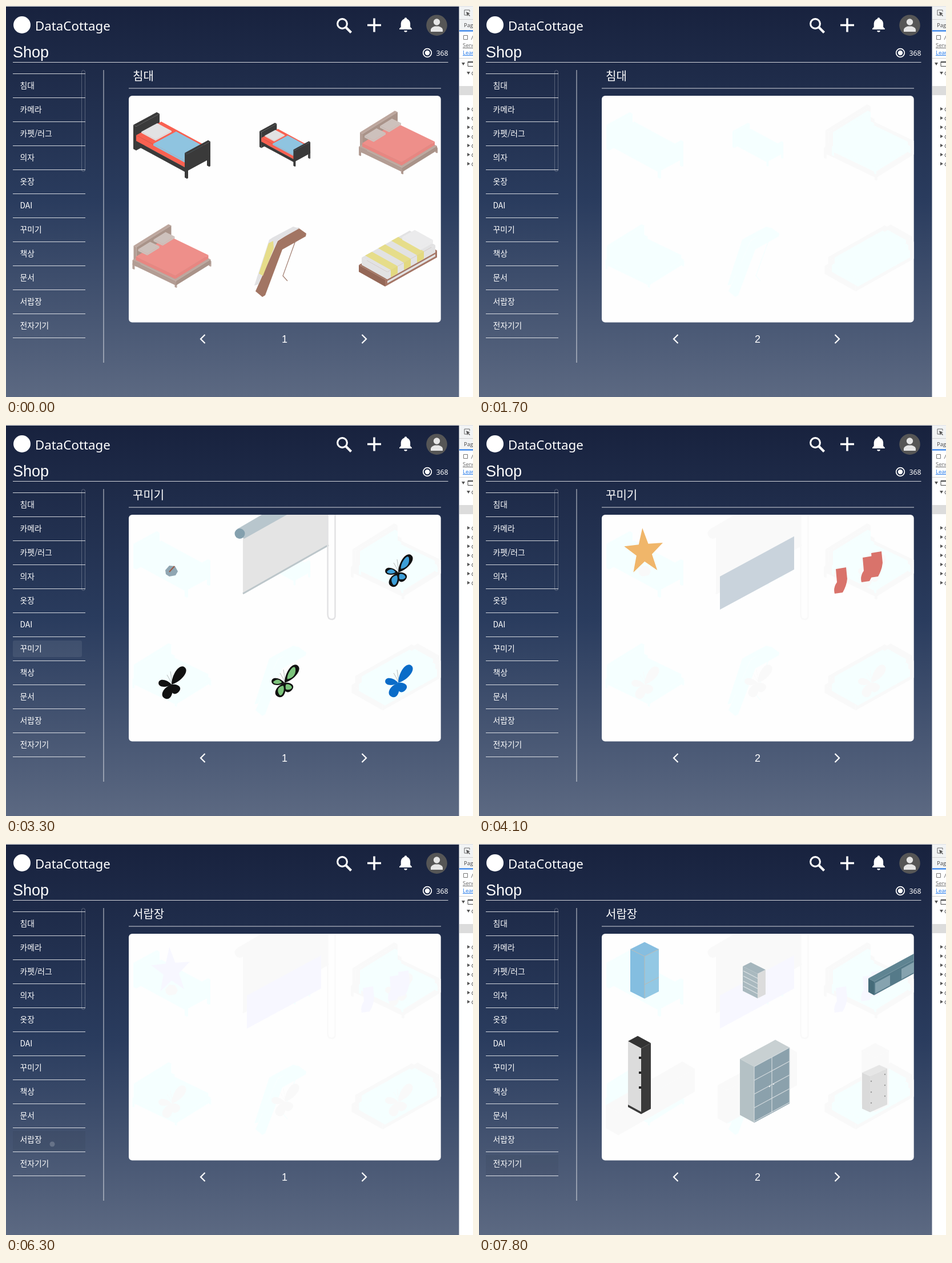
Write an HTML page that moves like this. It is 818 by 684 pixels and loops after 8 s.

```html
<!DOCTYPE html>
<html lang="ko">
<head>
<meta charset="utf-8">
<title>Shop</title>
<style>
html, body { margin: 0; width: 100%; height: 100%; overflow: hidden; background: #fff; }
svg { display: block; width: 100vw; height: 100vh; }
text { font-family: "Noto Sans CJK KR", "Noto Sans CJK", "Noto Sans", sans-serif; fill: #fff; }
.latin { font-family: "Noto Sans", sans-serif; }
.arial { font-family: "Liberation Sans", Arial, sans-serif; }
.tool { font: 9.5px "Open Sans", sans-serif; fill: #444; }
</style>
</head>
<body>
<svg id="stage" viewBox="0 0 818 684" preserveAspectRatio="none"></svg>
<script>
const LOOP = 8000, STEP = 100;
const MENU = ['침대', '카메라', '카펫/러그', '의자', '옷장', 'DAI', '꾸미기', '책상', '문서', '서랍장', '전자기기'];
const TINTS = { gray: '#f9f9f9', cyan: '#f5ffff', lilac: '#f7f7ff', white: '#fefefe' };

const poly = (points, fill) => `<polygon points="${points}" fill="${fill}"/>`;
const path = (d, fill) => `<path d="${d}" fill="${fill}"/>`;
const line = (d, color, width = 1) =>
  `<path d="${d}" fill="none" stroke="${color}" stroke-width="${width}"/>`;
const rect = (x, y, w, h, fill, rx = 0) =>
  `<rect x="${x}" y="${y}" width="${w}" height="${h}" rx="${rx}" fill="${fill}"/>`;
const dot = (x, y, r, fill) => `<circle cx="${x}" cy="${y}" r="${r}" fill="${fill}"/>`;
const ring = (x, y, r, color, width) =>
  `<circle cx="${x}" cy="${y}" r="${r}" fill="none" stroke="${color}" stroke-width="${width}"/>`;
const text = (x, y, size, body, extra = '') =>
  `<text x="${x}" y="${y}" font-size="${size}" ${extra}>${body}</text>`;
const group = (id, body) => `<g id="${id}">${body}</g>`;
const move = (transform, body) => `<g transform="${transform}">${body}</g>`;
const times = (n, f) => Array.from({ length: n }, (_, i) => f(i)).join('');
const scaleAt = (x, y, s) => `translate(${x} ${y}) scale(${s}) translate(${-x} ${-y})`;
const ghost = (id, tint, body) => `<g id="${id}" filter="url(#${tint})">${body}</g>`;

// Isometric box: (x, y) is the left corner of its top, a runs to the front, b to the back.
function box(x, y, a, b, h, [top, left, right], ka = .54, kb = ka) {
  const da = a * ka, db = b * kb, mx = x + a, my = y + da, rx = mx + b, ry = my - db;
  return poly(`${x},${y} ${x + b},${y - db} ${rx},${ry} ${mx},${my}`, top) +
    poly(`${x},${y} ${mx},${my} ${mx},${my + h} ${x},${y + h}`, left) +
    poly(`${mx},${my} ${rx},${ry} ${rx},${ry + h} ${mx},${my + h}`, right);
}
const plain = color => [color, color, color];

const DARK = plain('#3a3a3a'), RED = plain('#f96151'), BLUE = plain('#8fc4e0'), LINEN = plain('#e2e2e3');
const TAN = ['#bda79e', '#b39d94', '#a99389'], PINK = ['#ee8f8a', '#e88681', '#e88681'], CUSHION = plain('#cdc1bc');
const WOOD = ['#a27563', '#946757', '#a57666'], YELLOW = ['#e6dd8a', 'none', '#e3d980'];
const SLATE = ['#c8d0d2', '#b4c1c5', '#8ba1ac'], PALE = ['#e6e6e6', '#dadada', '#dedede'];
const SKY = ['#86bee0', '#84bee0', '#93c8e4'], TEAL = ['#5f8492', '#456b79', '#557a89'];

// Beds
const singleBed =
  box(223, 208, 5, 41, 42, DARK) + box(228, 236, 86, 44, 8, DARK) + box(228, 226, 86, 44, 10, RED) +
  box(237, 220, 25, 28, 2, LINEN) + box(258, 241, 55, 40, 3, BLUE) +
  box(313, 257, 4, 41, 28, DARK) + box(313, 284, 4, 2, 16, DARK) + box(352, 262, 4, 2, 17, DARK);
const tanBox = (x, y, a, b, h, colors) => box(x, y, a, b, h, colors, .48, .62);
const doubleBed =
  tanBox(620, 221, 5, 61, 34, TAN) + [[618, 252], [692, 284], [752, 247]].map(([x, y]) => tanBox(x, y, 3, 1, 9, TAN)).join('') +
  tanBox(618, 246, 76, 61, 8, TAN) + tanBox(624, 240, 69, 58, 6, PINK) +
  tanBox(628, 227, 16, 21, 3, CUSHION) + tanBox(655, 210, 16, 21, 3, CUSHION);
const wallBed =
  poly('437,499 476,411 512,388 526,398 525,403 484,426 454,506 449,509', '#a27563') +
  poly('435,489 461,409 467,405 503,386 514,389 476,410 442,487', '#e2e2e4') +
  poly('443,468 460,415 468,411 469,424 450,472', '#e6dd8a') +
  line('M507 411L485 472l8 9', '#a58376', 1.3);
const woodBox = (x, y, a, b, h, colors) => box(x, y, a, b, h, colors, .56);
const stripedBed =
  woodBox(618, 453, 46, 91, 12, WOOD) + woodBox(668, 481, 0, 84, 4, LINEN) +
  woodBox(623, 440, 45, 84, 13, LINEN) +
  times(3, i => woodBox(629 + 23 * i, 436.6 - 12.9 * i, 45, 12, 13, YELLOW)) +
  woodBox(694, 404, 32, 22, 5, plain('#ebebec'));
const otherBeds = singleBed + move('translate(296.8 81.6) scale(.66)', singleBed) +
  move('translate(-396.5 198.5)', doubleBed) + wallBed;

// Decorations
const WINGS = [[-53, 38, 11], [50, 18, 11], [188, 23, 8], [116, 27, 11]]; // angle, length, width
const wing = ([angle, len, w], s, fill) => move(`translate(23 31) rotate(${angle})`,
  path(`M${len * (1 - s) * .6} 0C${len * .4} ${-w * s} ${len} ${-w * s} ${len * (s + 1) / 2} 0S${len * .4} ${w * s} ${len * (1 - s) * .6} 0z`, fill));
const butterfly = (x, y, edge, cell = edge) => move(`translate(${x} ${y})`,
  line('M23 28L15 14M24 28L21 8', '#999', .7) +
  WINGS.map(w => wing(w, 1, edge) + wing(w, .65, cell)).join(''));
const blind =
  poly('415,197 485,157 564,157 564,211 415,296', '#e4e4e4') +
  poly('405,182 448,157 492,157 417,199', '#b8c6cd') + dot(409.5, 190, 9, '#84a0ae') +
  line('M415 295L565 210', '#bcc6ca', 3) + line('M563.5 157V331q0 9 7 9t6-9V157', '#e2e2e4', 2.5);
const smallDecor =
  poly('279,254 286,246 296,247 301,256 297,263 286,265 280,261', '#8fa6b2') + line('M286 257l9-10', '#9a5b48', 2) +
  butterfly(664, 227, '#111', '#3d9fd8') + butterfly(267, 423, '#111') +
  butterfly(465, 420, '#111', '#7cc47c') + butterfly(664, 420, '#0a6cc8');

function star(x, y, r, fill) {
  const points = Array.from({ length: 10 }, (_, i) => {
    const angle = i * Math.PI / 5 - 1.65, d = i % 2 ? r * .4 : r;
    return `${x + d * .85 * Math.cos(angle)},${y + d * Math.sin(angle)}`;
  });
  return poly(points.join(' '), fill);
}
const starfish = star(289, 222, 42, '#f0b66a');
const hangings = box(422, 265, 0, 130, 58, plain('#c9d3dc')) +
  [[0, 0], [47, -20], [62, -28]].map(([x, y]) =>
    move(`translate(${x} ${y})`, path('M625 252l18-3 2 20q-1 12-8 24l-14 2q-3-10 4-20z', '#d9736b'))).join('');

// Cabinets
const lowCabinets = box(222, 457, 22, 134, 40, SLATE, .57) + box(418, 422, 16, 123, 58, SLATE) +
  box(670, 361, 24, 24, 95, SLATE);
const cabinetsOne = box(260, 208, 31, 31, 46, SKY) + box(462, 220, 26, 26, 40, SLATE) +
  box(664, 232, 22, 26, 42, PALE) + lowCabinets;
const cabinetsTwo =
  box(265, 184, 25, 25, 74, SKY, .5) + line('M265 184l25 12.5 25-12.5M290 196v74M290 246l25-13', '#b9b9b2') +
  box(462, 214, 26, 14, 43, ['#a5b6bd', '#a9b9bf', '#dcdcdc'], .5) +
  times(4, i => line(`M463 ${222 + i * 9}l25 13`, '#dfe4e6', 1.2)) +
  box(682, 235, 10, 80, 24, TEAL) + [694, 740].map(x => box(x, 618 - x * .54, 0, 26, 18, plain('#86a3af'))).join('') +
  box(261, 345, 23, 17, 115, ['#333', '#dcdcdc', '#3a3a3a']) + box(261, 456, 23, 0, 4, DARK) +
  times(3, i => rect(280, 372 + i * 26, 4, 4, '#222')) +
  box(457, 376, 25, 62, 98, SLATE) +
  times(5, i => line(`M482 ${389.5 + i * 24}l62-33.5`, '#d3dadd', 1.2)) +
  times(3, i => line(`M${482 + 31 * i} ${389.5 - 16.7 * i}v97`, '#d3dadd', 1.2)) +
  dot(509, 424, 1.2, '#e8ecee') + dot(516, 420, 1.2, '#e8ecee') +
  box(671, 400, 14, 30, 63, PALE, .45) +
  times(6, i => dot(687 + 24 * (i % 2), 415 - 12 * (i % 2) + 19 * (i >> 1), 1.2, '#999'));

// Faint residue left on the white panel
const residue =
  ghost('haloA', 'gray', move(scaleAt(687, 239, 1.2), doubleBed)) +
  ghost('haloB', 'gray', move(scaleAt(687, 444, 1.18), stripedBed)) +
  ghost('bedGhost', 'cyan', otherBeds + doubleBed + stripedBed) +
  ghost('blindGhost', 'gray', blind) + ghost('decorGhost', 'gray', smallDecor) +
  ghost('hangGhost', 'lilac', hangings) + ghost('starGhost', 'lilac', starfish) +
  ghost('lowGhost', 'gray', lowCabinets);

// Page chrome
const RULE = 'rgba(255,255,255,.8)';
const header =
  dot(28, 33, 15, '#fff') + text(51, 43, 22.3, 'DataCottage', 'class="latin"') +
  ring(589, 31, 8.4, '#fff', 3.1) + line('M595.5 37.5l9 9', '#fff', 4.2) +
  line('M633 33.5h24M645 21.5v24', '#fff', 3.6) +
  path('M689 41v-1.5l2.7-2.7v-6.5a8.2 8 0 0 1 16.4 0v6.5l2.7 2.7v1.5z', '#fff') + dot(700, 22.5, 2.2, '#fff') +
  path('M697.3 43h5.400a2.7 2.700 0 0 1-5.4 0z', '#fff') +
  dot(754.5, 33.7, 18.3, '#565656') + dot(754.5, 28, 5.7, '#e6e6e6') +
  path('M744 45v-4q1-4 7-5.5h7q6 1.5 7 5.5v4z', '#e6e6e6') +
  text(12, 90, 27, 'Shop', 'class="arial"') +
  ring(738, 82, 7.3, '#fff', 1.7) + dot(738, 82, 4.2, '#fff') + text(753.5, 87, 12.3, '368', 'class="latin"') +
  line('M12 98.5H774.5M215 144H762M171 112V624', RULE);
const menu =
  times(12, i => line(`M12 ${118.5 + 42 * i}H139`, RULE)) +
  MENU.map((name, i) => text(24.5, 144 + 42 * i, 13.8, name)).join('') +
  '<rect x="132.5" y="112.5" width="6" height="177" rx="3" fill="none" stroke="#fff" stroke-opacity=".25"/>';
const pager = line('M348.5 575l-7.5 7.5 7.5 7.5M623.5 575l7.5 7.5-7.5 7.5', '#fff', 2.2) +
  text(488, 588.5, 18, '', 'id="page" class="arial" text-anchor="middle"');

const tree = (x, y, open) => path(open ? `M${x - 3} ${y - 2}h6l-3 5z` : `M${x - 2} ${y - 3}v6l5-3z`, '#555');
const label = (x, y, body, fill, extra = '') => text(x, y, 9.5, body, `class="tool" style="fill:${fill}" ${extra}`);
const tools =
  rect(793.5, 0, 25, 684, '#fff') + rect(794, 1, 24, 42, '#f1f3f4') +
  line('M794 23.5h24M794 91.5h24', '#d0d0d0') + line('M794 43.5h24', '#1a73e8', 2) +
  line('M809 16h-6v-9h9v3', '#666') + path('M806 10l7 3-3 1 3 3-1 1-3-3-1 3z', '#555') +
  label(802, 37, 'Page', '#444') + line('M801.5 51.5h7v7h-7zM815 59l3-7', '#777') +
  label(800, 72, 'Send', '#666', 'text-decoration="underline"') +
  label(800, 85, 'Learn', '#1a73e8', 'text-decoration="underline"') +
  tree(801, 101, true) + line('M819 97.5h-10v8h10M809 98.5h9', '#444') +
  tree(810, 117, true) + ring(819, 118, 3, '#555', 1) + rect(794, 140, 24, 16, '#dcdcdc') +
  times(7, i => tree(810, 180 + 16 * i) + ring(819, 181 + 16 * i, 3, '#555', 1));

const tintFilters = Object.entries(TINTS).map(([id, color]) =>
  `<filter id="${id}" color-interpolation-filters="sRGB"><feFlood flood-color="${color}"/>` +
  '<feComposite in2="SourceAlpha" operator="in"/></filter>').join('');
const stage = document.getElementById('stage');
stage.innerHTML = `<defs>${tintFilters}
  <linearGradient id="night" x2="0" y2="1">
    <stop offset="0" stop-color="#18223e"/><stop offset=".5" stop-color="#2a3c5e"/><stop offset="1" stop-color="#5c6982"/>
  </linearGradient>
  <clipPath id="panel">${rect(215, 157, 546.7, 396.5, '#fff', 6)}</clipPath></defs>` +
  rect(0, 0, 794, 684, 'url(#night)') +
  '<rect id="row" x="12"/><circle id="ripple" cx="81" r="4.5" fill="#fff" fill-opacity=".2"/>' +
  header + menu + text(222, 130, 20, '', 'id="title"') + pager +
  `<g clip-path="url(#panel)">${rect(215, 157, 547, 397, TINTS.white)}` + residue +
  group('beds', otherBeds + group('bedC', doubleBed) + group('bedF', stripedBed)) +
  group('decorOne', blind + smallDecor) + group('decorTwo', starfish + hangings) +
  group('cabinetsOne', cabinetsOne) + group('cabinetsTwo', cabinetsTwo) + '</g>' +
  tools + rect(0, 0, 818, 1, '#dfe1e5');

const parts = Object.fromEntries([...stage.querySelectorAll('[id]')].map(el => [el.id, el]));
const show = (id, on) => parts[id].setAttribute('display', on ? 'inline' : 'none');
const within = (t, from, to = LOOP) => t >= from && t < to;

// Last value whose start time has passed.
const pick = (t, list) => list.filter(([start]) => t >= start).pop()[1];

// Hover zoom: eases in, holds, then springs back with a small overshoot.
function hoverScale(t, enter, leave) {
  const rise = Math.min(1, Math.max(0, (t - enter) / 200));
  const s = Math.max(0, (t - leave) / 1000);
  return 1 + .2 * rise * Math.exp(-6 * s) * Math.cos(9 * s) * (s < .45 ? 1 : 0);
}

function highlight(t) {
  const [index, kind] = pick(t, [
    [0, [0, '']], [2900, [6, 'hover']], [3100, [6, 'press']], [3600, [0, '']],
    [6300, [9, 'hover']], [6400, [9, 'press']], [6700, [0, '']], [7800, [10, 'hover']]]);
  const press = kind === 'press', y = 118 + 42 * index;
  const attrs = press
    ? { y: y + 7, width: 121, height: 29, rx: 3, fill: '#fff', 'fill-opacity': .08 }
    : { y: y + 6, width: 127, height: 35, rx: 0, fill: '#000', 'fill-opacity': .05 };
  for (const key in attrs) parts.row.setAttribute(key, attrs[key]);
  show('row', kind);
  parts.ripple.setAttribute('cy', y + 29);
  show('ripple', within(t, 3100, 3200) || within(t, 6300, 6400));
}

function draw(t) {
  parts.title.textContent = pick(t, [[0, '침대'], [3100, '꾸미기'], [6300, '서랍장']]);
  parts.page.textContent = pick(t, [[0, 1], [1000, 2], [2000, 1], [4000, 2], [4800, 3], [5800, 2], [6300, 1], [7200, 2]]);
  highlight(t);

  show('beds', t < 1000 || within(t, 2100, 3100));
  show('decorOne', within(t, 3200, 4000));
  show('decorTwo', within(t, 4100, 4800) || within(t, 5900, 6300));
  show('cabinetsOne', within(t, 6400, 7200));
  show('cabinetsTwo', within(t, 7300));
  parts.bedC.setAttribute('transform', scaleAt(687, 239, hoverScale(t, 100, 500)));
  parts.bedF.setAttribute('transform', scaleAt(687, 444, hoverScale(t, 300, 680)));

  show('haloA', t >= 300);
  show('haloB', t >= 500);
  show('bedGhost', t >= 1000 && !within(t, 2100, 3100));
  show('blindGhost', t >= 4000);
  show('decorGhost', within(t, 4000, 6400));
  show('hangGhost', t >= 4800);
  show('starGhost', within(t, 4800, 6400));
  show('lowGhost', t >= 7200);
  for (const id of ['hangGhost', 'starGhost'])
    parts[id].setAttribute('filter', `url(#${t < 5800 ? 'white' : 'lilac'})`);
}

const start = performance.now();
function tick() {
  const t = (performance.now() - start) % LOOP;
  draw(Math.floor(t / STEP) * STEP);
  requestAnimationFrame(tick);
}
tick();
</script>
</body>
</html>
```
